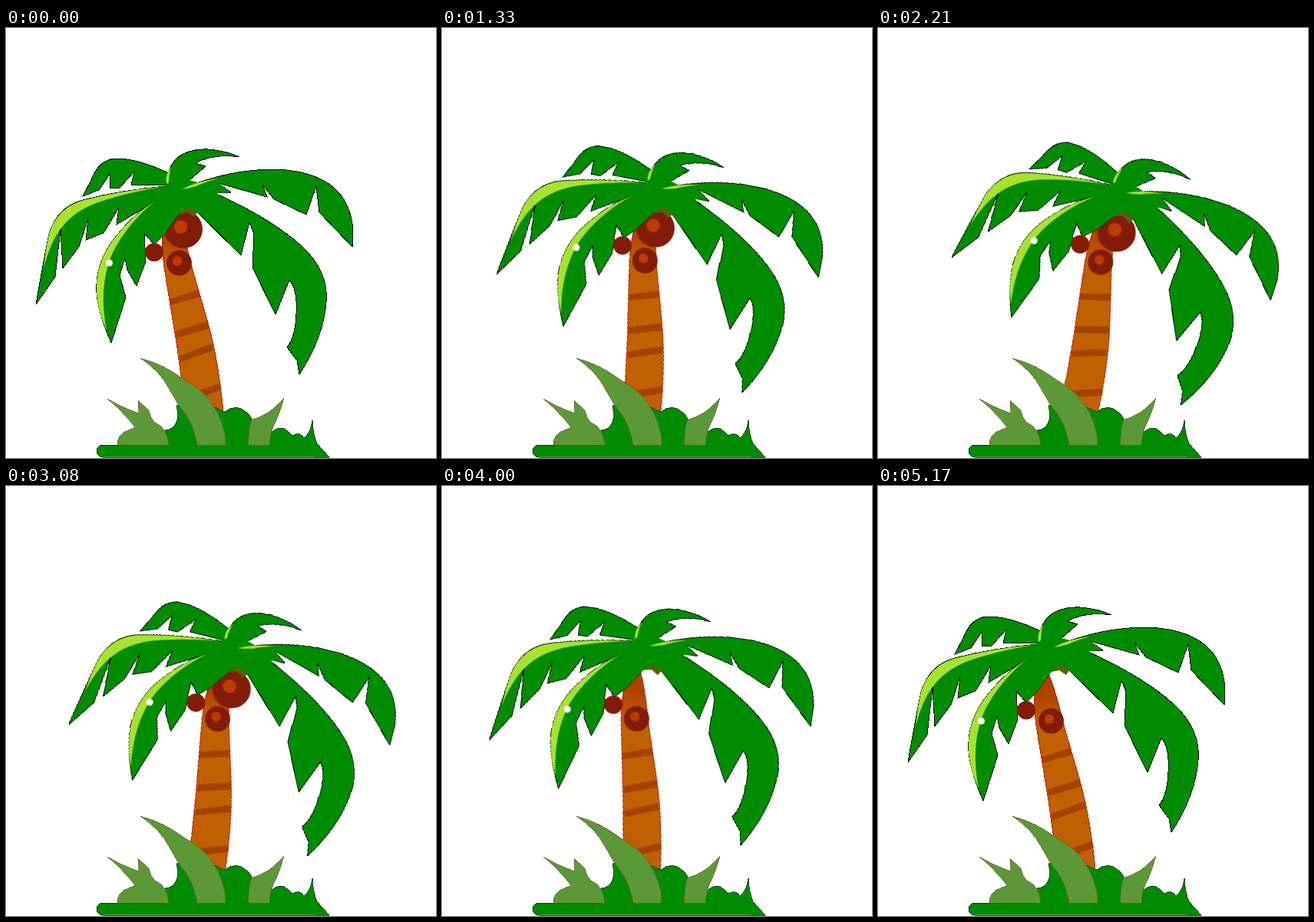
An HTML page without scripts for the animation above (5.21 s loop, 560 by 560 pixels).

```html
<!DOCTYPE html>
<html lang="en">
<head>
<meta charset="utf-8">
<title>Swaying palm</title>
<style>
  html, body { margin: 0; width: 100%; height: 100%; overflow: hidden; background: #fff; }
  svg { display: block; width: 100vw; height: 100vh; }

  /* the small head start centres each step on its picture */
  .tree { transform-origin: 261px 510px; animation: sway 5210ms -20ms infinite; }
  .loose { animation: drop 5210ms linear infinite; }

  /* 125 pictures per loop: 56 to the right, 68 back, one held */
  @keyframes sway {
    0% { transform: rotate(0deg); animation-timing-function: steps(56, end); }
    44.8% { transform: rotate(18.9deg); animation-timing-function: steps(68, end); }
    99.2%, 100% { transform: rotate(0deg); }
  }
  @keyframes drop {
    0%, 25.6% { transform: translate(0, 0); }
    42.4% { transform: translate(2.5px, 1px); }
    62.4% { transform: translate(3px, 2px); animation-timing-function: cubic-bezier(.4, 0, .9, .7); }
    73%, 100% { transform: translate(60px, 342px); }
  }

  .leaf, .bark, .bush, .blade { shape-rendering: crispEdges; }
  .leaf { fill: #008c00; stroke: #021002; stroke-width: 1; }
  .hub { fill: #008c00; }
  .lime { fill: #a6e22e; }
  .bark { fill: url(#bark); stroke: #b02a10; stroke-width: 1; }
  .ring { fill: #a34200; }
  .nut { fill: #821c08; }
  .eye { fill: #ba3c02; }
  .bush { fill: #008c00; stroke: #062806; stroke-width: .8; }
  .blade { fill: #5c9838; stroke: #6a5a30; stroke-width: .7; }
</style>
</head>
<body>
<svg viewBox="0 0 560 560">
  <defs>
    <linearGradient id="bark" gradientUnits="userSpaceOnUse" x1="0" y1="270" x2="0" y2="312">
      <stop offset="0" stop-color="#b04000"/>
      <stop offset="1" stop-color="#c06000"/>
    </linearGradient>
  </defs>

  <g class="tree">
    <path class="bark" d="M204 262 Q203 290 206 312 L213 355 L222 410 L229 460 L234 515 L284 515 Q283 490 276 444 Q270 408 262 380 L241 308 Q234 275 223 246Z"/>
    <g class="ring">
      <path d="M213 353 L250 341 L253 350 L214 361Z"/>
      <path d="M221 395 L262 382 L265 391 L222 404Z"/>
      <path d="M226 427 L268 411 L270 420 L227 435Z"/>
      <path d="M231 480 L279 462 L281 471 L232 489Z"/>
    </g>

    <g class="loose">
      <circle class="nut" cx="231" cy="262" r="25"/>
      <circle class="eye" cx="227.5" cy="259" r="8.8"/>
    </g>

    <!-- fronds: open at the hub so the seams carry no outline -->
    <g class="leaf">
      <path d="M212 189 Q172 170 143 170 Q121 171 111 198 L100 219 L121 211 L135 190 L136 209 L148 208 L167 187 L163 205 L208 204"/>
      <path d="M208 206 Q150 211 100 224 Q67 233 56 268 Q46 318 39 360 L64 324 L71 262 L74 313 L95 285 L107 248 L104 276 L127 267 L147 234 L144 256 L192 227"/>
      <path d="M195 224 Q160 247 136 281 Q113 316 119 354 Q123 379 137 410 L156 351 L148 322 L155 300 L158 315 L170 336 L182 304 L180 267 L193 282 L206 269 L224 244"/>
      <path d="M210 202 Q208 188 220 172 Q235 157 263 158 Q288 160 304 168 Q270 163 247 176 L260 180 L238 199"/>
      <path d="M230 209 Q290 184 350 184 Q410 186 435 216 Q456 243 451 285 L408 240 L404 206 L391 243 L349 223 L334 204 L340 220 L276 202 L293 214 L275 215"/>
      <path d="M274 216 Q345 248 385 284 Q421 317 417 358 Q413 404 382 451 L379 433 L366 416 Q377 402 378 372 Q380 341 369 328 L351 373 L321 312 L323 268 L317 253 L306 296 L247 238"/>
    </g>
    <path class="hub" d="M190 226 L206 206 L207 201 L211 188 L225 186 L239 198 L250 201 L278 203 L292 214 L275 215 L276 218 L248 239 L236 234 L224 244 L206 269 L198 260Z"/>
    <path d="M226 242 L236 233 L250 239 L245 246 L236 240Z" fill="#56600c"/>

    <g class="lime">
      <path d="M205 206.500 Q150 211.500 100 224.500 Q67 234 56 268 Q51 290 49 313 Q58 277 74 258 Q90 238 120 227 Q155 215 205 206.500Z"/>
      <path d="M193 226 Q160 247 136 281 Q113 316 119 354 Q122 375 131 394 Q126 368 127 345 Q129 309 143 285 Q161 253 193 226Z"/>
      <path d="M209 203 Q207 191 215 181 Q212 192 212 201Z"/>
      <path d="M229 210 Q250 199 276 196 Q258 201 248 206 Q238 209 229 210Z"/>
    </g>
    <circle cx="134.500" cy="306" r="4.500" fill="#fff"/>

    <circle class="nut" cx="193" cy="292" r="12"/>
    <circle class="nut" cx="225.500" cy="306" r="16.500"/>
    <circle class="eye" cx="223" cy="303.500" r="6.200"/>
  </g>

  <path class="bush" d="M126 559 A8 8 0 0 1 126 543 H205 L207 524 Q217 523 221 515 Q226 506 222 492 L262 490 L285 500 Q298 489 311 499 Q318 503 320 510 L346 526 Q358 516 368 526 Q371 528 373 531 Q383 525 388 534 Q397 527 399 511 Q400 530 405 541 L421 559Z"/>
  <g class="blade">
    <path d="M175 430 Q206 438 232 458 Q258 473 268 488 Q287 518 286 543 H249 Q246 522 234 503 Q222 488 213 471 Q201 447 175 430Z"/>
    <path d="M145 543 Q145 528 159 524 L168 520 Q150 497 132 483 Q151 494 173 502 L172 485 L186 498 Q188 508 194 514 Q210 520 212 543Z"/>
    <path d="M316 543 Q315 522 320 510 Q340 506 362 482 Q357 500 351 513 Q344 526 343 543Z"/>
  </g>
  <path d="M126 558.500 H402" stroke="#5c9838" stroke-width="1"/>
</svg>
</body>
</html>
```
